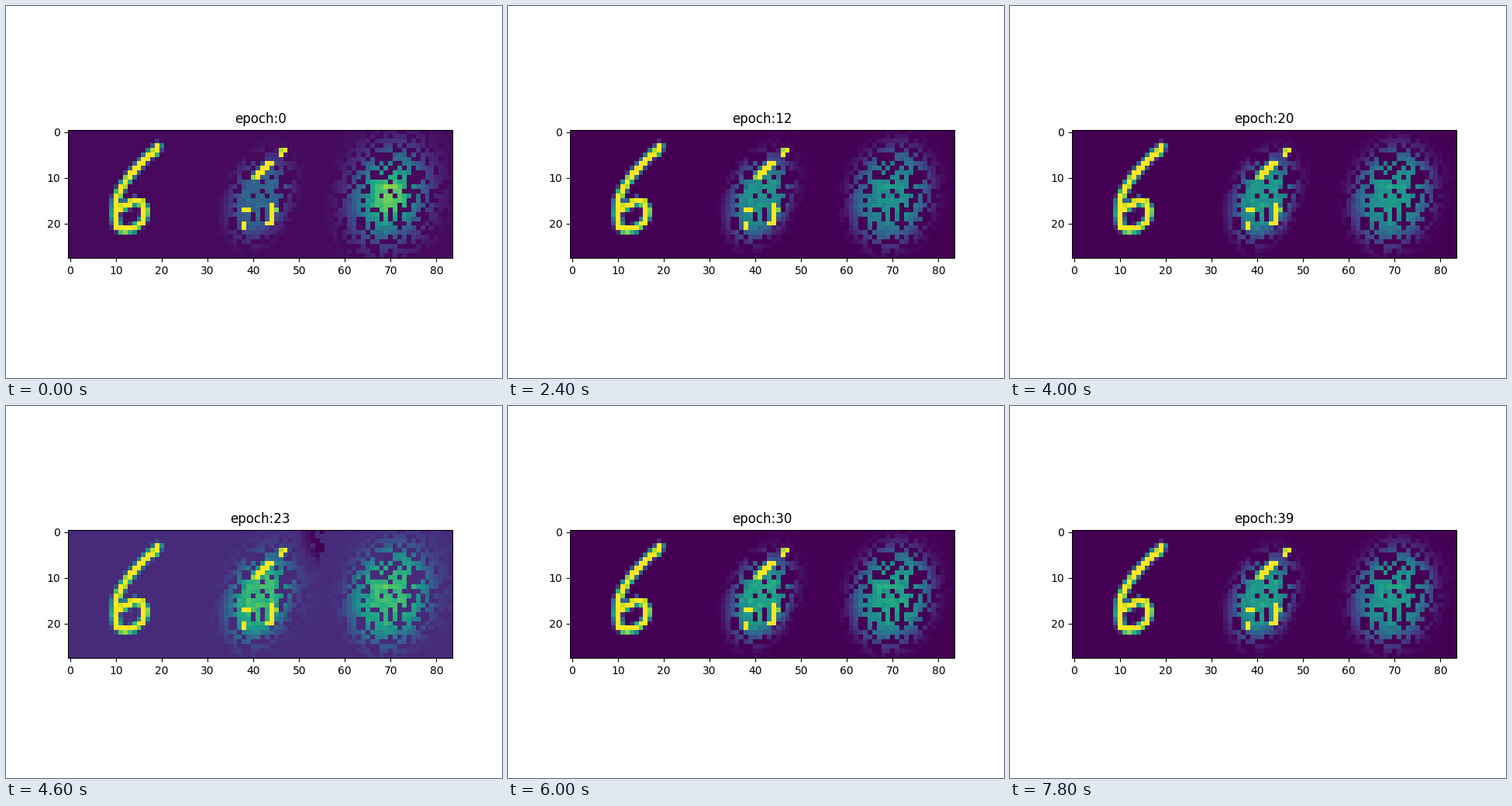
A matplotlib script that plays this animation: 640 by 480 pixels, repeating every 8 s.

```python
import numpy as np
import matplotlib.pyplot as plt
from matplotlib.animation import FuncAnimation

SIDE = 28
EPOCHS = 40
SPIKE = 23  # the one epoch where training jumps
ROW, COL = np.mgrid[0:SIDE, 0:SIDE].astype(float)

# Centre line of the handwritten digit, as (column, row)
STROKE = [(19.1, 3.2), (18.7, 4.3), (17.5, 4.8), (15.7, 6.7), (13, 9.6),
          (11.2, 12.2), (10, 14.7), (9.8, 18), (10.2, 20.7), (11.5, 21.5),
          (13.8, 21.1), (15.8, 19.6), (16.5, 17.4), (15.8, 15.5),
          (13.8, 15.1), (12, 16.2), (10.8, 16.6)]


def draw_digit():
    dist = np.full((SIDE, SIDE), 99.0)
    for (x0, y0), (x1, y1) in zip(STROKE, STROKE[1:]):
        dx, dy = x1 - x0, y1 - y0
        t = ((COL - x0) * dx + (ROW - y0) * dy) / (dx * dx + dy * dy)
        t = np.clip(t, 0, 1)
        dist = np.minimum(dist, np.hypot(COL - x0 - t * dx, ROW - y0 - t * dy))
    return np.clip(1.5 - 1.15 * dist, 0, 1)


def make_mask(digit):
    """True where the input cell is shown to the model."""
    mask = np.random.default_rng(6).random((SIDE, SIDE)) < .4
    tip = (ROW >= 4) & (ROW <= 5) & (COL >= 18)
    slope = (ROW >= 7) & (ROW <= 10)
    loop = (ROW >= 16) & (ROW <= 20) & (COL >= 15)
    left = (COL <= 11) & (ROW >= 12) & mask
    ink = (digit > .8) & (tip | slope | loop | left)
    return np.where(digit > .1, ink, mask)


def blob(cx, cy, rx, ry, tilt, power):
    x = COL - cx + tilt * (ROW - cy)
    d = np.hypot(x / rx, (ROW - cy) / ry)
    return np.exp(-1.9 * d ** power)


digit = draw_digit()
mask = make_mask(digit)
grain = np.random.default_rng(11).normal(0, .06, (2, SIDE, SIDE))


def compose(epoch):
    rng = np.random.default_rng(100 + epoch)
    speckle = 1 + grain + rng.normal(0, .03, (2, SIDE, SIDE))
    sway = rng.normal(0, .12, 2)
    start = np.exp(-epoch)
    drift = .52 + .04 * np.cos(2 * np.pi * (epoch - 30) / 36)

    fill = (drift - .25 * start) * blob(13.2 + sway[0], 14.5, 7.6, 10.7, .22, 4)
    guess = (drift + .2 * start) * blob(13.6 + sway[1], 14, 9.9, 12.3, .1,
                                        4 - 1.8 * start)
    haze = .1 if epoch == SPIKE else .02
    fill += haze * blob(15, 13, 11, 14, .2, 3)
    guess += haze * blob(16, 12, 14, 15, .1, 3)
    fill, guess = np.array([fill, guess]) * speckle
    if epoch == SPIKE:
        fill -= .2 * np.clip((COL - 21) / 6, 0, 1) * np.clip((9 - ROW) / 6, 0, 1)
    return np.hstack([digit, np.where(mask, digit, fill),
                      np.where(mask, 0, guess)])


def floor(epoch):
    return -.14 if epoch == SPIKE else -.025 * np.exp(-3 * epoch)


fig, ax = plt.subplots(figsize=(6.4, 4.8), dpi=100)
image = ax.imshow(compose(0), cmap="viridis", vmin=floor(0), vmax=1)
title = ax.set_title("epoch:0")


def update(epoch):
    image.set_data(compose(epoch))
    image.set_clim(floor(epoch), 1)
    title.set_text(f"epoch:{epoch}")
    return image, title


anim = FuncAnimation(fig, update, frames=EPOCHS, interval=200,
                     repeat=True, repeat_delay=0)
plt.show()
```
